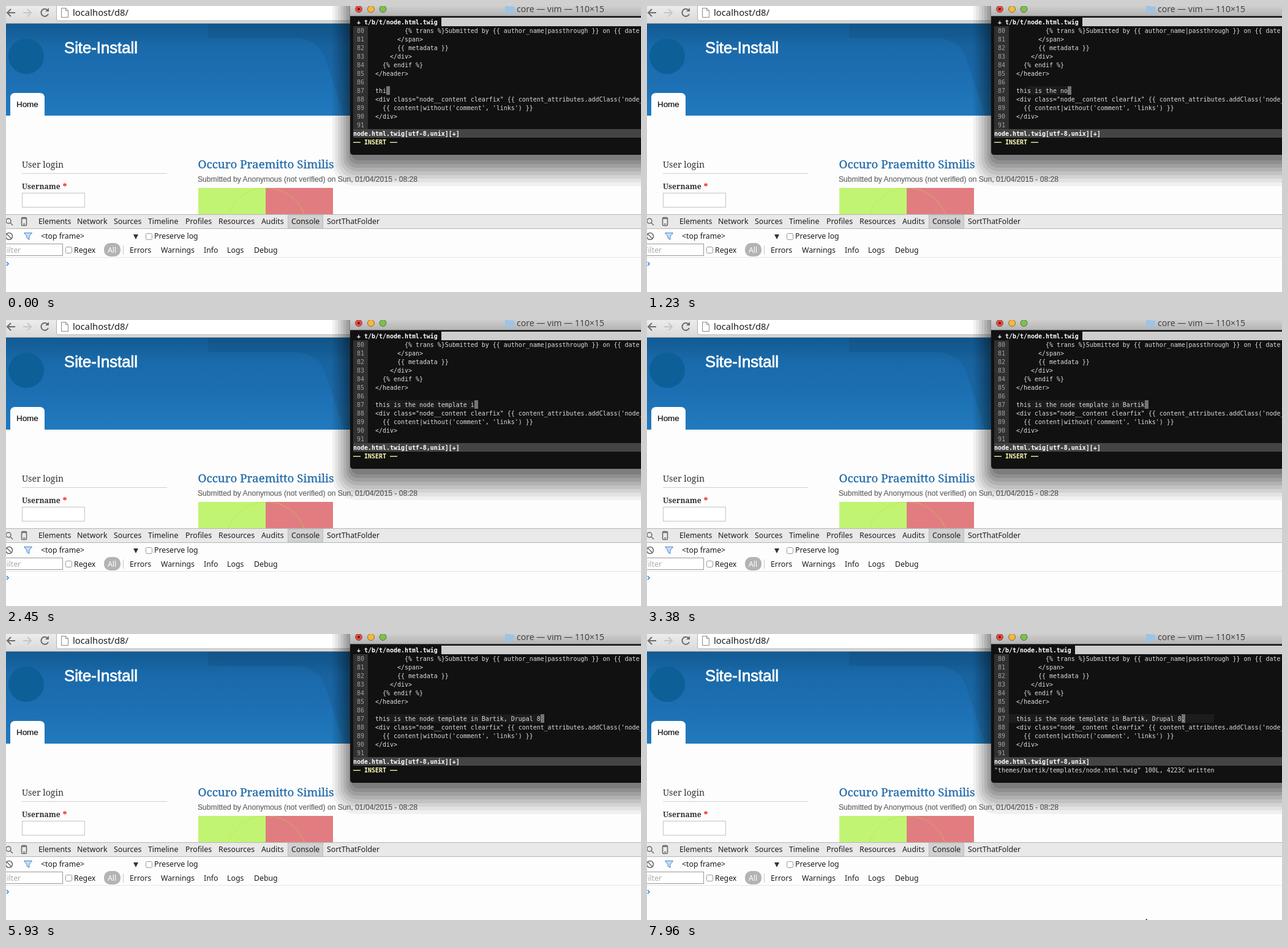
An HTML page that plays this animation: 1037x467 px, repeating every 8000 ms.

```html
<!DOCTYPE html>
<html lang="en">
<head>
<meta charset="utf-8">
<title>Editing a template</title>
<style>
html, body { margin: 0; width: 100%; height: 100%; overflow: hidden; background: #fdfdfd; }
svg { display: block; }
text { white-space: pre; }
.ui { font-family: "Noto Sans", "Open Sans", sans-serif; font-size: 12.3px; fill: #1c1c1c; }
.sans { font-family: "Liberation Sans", sans-serif; }
.serif { font-family: "Noto Serif", serif; fill: #333; }
.term { font-family: "DejaVu Sans Mono", monospace; font-size: 9.967px; fill: #dedede; }
.bold { font-weight: bold; fill: #fff; }
.num { fill: #a2a2a2; }
.line { fill: none; stroke: #666; stroke-width: 1.5; }
</style>
</head>
<body>
<svg width="1037" height="467" viewBox="0 0 1037 467">
  <defs>
    <linearGradient id="toolbar" x2="0" y2="1"><stop stop-color="#ececec"/><stop offset="1" stop-color="#d9d9d9"/></linearGradient>
    <linearGradient id="header" x2="0" y2="1">
      <stop stop-color="#125b93"/><stop offset=".14" stop-color="#16629e"/>
      <stop offset=".26" stop-color="#1a6aab"/><stop offset=".6" stop-color="#1c6fb2"/>
      <stop offset="1" stop-color="#217abe"/>
    </linearGradient>
    <linearGradient id="titlebar" x2="0" y2="1"><stop stop-color="#d6d6d6"/><stop offset="1" stop-color="#b4b4b4"/></linearGradient>
    <clipPath id="picture"><path d="M314 297H534V340H314z"/></clipPath>
  </defs>

  <!-- Browser toolbar -->
  <rect width="1037" height="28" fill="url(#toolbar)"/>
  <rect x="82.500" y="-6" width="980" height="30" rx="3" fill="#fff" stroke="#b0b0b0"/>
  <g fill="none" stroke="#6c6c6c" stroke-width="2">
    <path d="M15 11H2M8 5L2 11L8 17"/>
    <path d="M28 11H41M35 5L41 11L35 17" stroke="#c6c6c6"/>
    <path d="M68 7A6 6 0 1 0 69 13"/><path d="M70 3V9H64z" fill="#6c6c6c" stroke="none"/>
  </g>
  <path d="M90.500 3.500H97.500L101.500 7.500V18.500H90.500zM97.500 3.500V7.500H101.500" fill="#fff" stroke="#8a8a8a"/>
  <text class="ui" x="109" y="16" style="font-size:14.800px">localhost/d8/</text>

  <!-- Web page -->
  <rect y="28" width="1037" height="151" fill="url(#header)"/>
  <path d="M0 28.500H1037" stroke="#8e979e"/>
  <path d="M330 29V52H470Q512 54 522 88L552 179H1037V29z" opacity=".07"/>
  <circle cx="33" cy="82" r="29" fill="#0d5f98"/>
  <text class="sans" x="95" y="77" font-size="25.700" fill="#fff" stroke="#fff" stroke-width=".8">Site-Install</text>
  <path d="M7 179V150Q7 142 15 142H55Q63 142 63 150V179z" fill="#fdfdfd"/>
  <text class="sans" x="17" y="165" font-size="13.400" fill="#111" stroke="#111" stroke-width=".2">Home</text>
  <text class="serif" x="26" y="264" font-size="14.100">User login</text>
  <path d="M26 273.500H263" stroke="#d0d0d0"/>
  <text class="serif" x="26" y="299" font-size="12.200" font-weight="bold">Username</text>
  <text class="serif" x="92.500" y="300" font-size="14" font-weight="bold" style="fill:#f01818">*</text>
  <rect x="26.500" y="305.500" width="102" height="23" fill="#fff" stroke="#c4c4c4"/>
  <text class="serif" x="313.500" y="265" font-size="18.750" style="fill:#2069a8" stroke="#2069a8" stroke-width=".3">Occuro Praemitto Similis</text>
  <text class="sans" x="313" y="287" font-size="12.150" fill="#666" stroke="#666" stroke-width=".2">Submitted by Anonymous (not verified) on Sun, 01/04/2015 - 08:28</text>
  <g clip-path="url(#picture)">
    <rect x="314" y="297" width="110" height="44" fill="#c2f473"/>
    <rect x="424" y="297" width="110" height="44" fill="#e17d81"/>
    <circle cx="425" cy="363" r="66" fill="none" stroke="#b3e238" opacity=".5"/>
  </g>

  <!-- Developer tools -->
  <rect y="340" width="1037" height="127" fill="#fdfdfd"/>
  <rect y="340" width="1037" height="23" fill="#e9e9e9"/>
  <path d="M0 340.500H1037M0 363.500H1037" stroke="#b6b6b6"/>
  <path d="M0 410.500H1037" stroke="#e4e4e4"/>
  <rect x="460.500" y="341" width="57" height="22" fill="#d0d0d0" stroke="#bcbcbc"/>
  <circle class="line" cx="4" cy="351" r="4"/><path class="line" d="M7 354L11 358" stroke-width="2"/>
  <rect class="line" x="25.500" y="345.500" width="8" height="13" rx="1.500"/><path class="line" d="M26 347H33M28 356H31"/>
  <circle class="line" cx="5" cy="376" r="5.500"/><path class="line" d="M1 372L9 380"/>
  <path d="M29.500 370.500H42.500L38 376V381.500L34 379V376z" fill="#c5dcf8" stroke="#4b86d2"/>
  <path d="M208 373H216L212 381z" fill="#333"/>
  <g fill="#fff" stroke="#999">
    <rect x="228.500" y="371.500" width="10" height="10" rx="2"/>
    <rect x="97.500" y="393.500" width="10" height="10" rx="2"/>
    <rect x="-4" y="388.500" width="96.500" height="19"/>
  </g>
  <rect x="160" y="387" width="27" height="22" rx="10" fill="#b3b3b3"/>
  <path d="M191.500 391V406" stroke="#c8c8c8"/>
  <path d="M1 418L4 421L1 424" fill="none" stroke="#3c80dc" stroke-width="1.600"/>
  <g id="labels" class="ui"></g>

  <!-- Terminal window -->
  <g id="shadow"></g>
  <path d="M562 -10H1037V243H567Q562 243 562 238z" fill="#111"/>
  <rect x="562" y="-5" width="475" height="21" fill="url(#titlebar)"/>
  <path d="M562 16.500H1037" stroke="#555"/>
  <g stroke-opacity=".5" stroke="#222">
    <circle cx="576" cy="5" r="5.500" fill="#ec4b42"/>
    <circle cx="596" cy="5" r="5.500" fill="#f5b83c"/>
    <circle cx="615.500" cy="5" r="5.500" fill="#7cc04a"/>
  </g>
  <circle cx="576" cy="5" r="2" fill="#6b1410"/>
  <path d="M815 0H821L823 1H830V12H815z" fill="#9fc3e2"/>
  <text class="ui" x="834" y="10" style="font-size:14px;fill:#444">core — vim — 110×15</text>
  <rect id="tabFill" y="19" height="14" width="400" fill="#cecece"/>
  <rect x="567" y="33" width="24" height="168" fill="#303030"/>
  <rect x="567" y="201" width="470" height="14" fill="#444"/>
  <rect id="cursorLine" y="131" height="14" fill="#1c1c1c"/>
  <rect id="cursor" width="6" height="14" fill="#747474"/>
  <g id="code" class="term"></g>
  <g class="term">
    <text id="tab" class="bold" x="567" y="30"></text>
    <text id="typed" x="603" y="142"></text>
    <text id="status" class="bold" x="567" y="212"></text>
    <text id="message" x="567" y="226"></text>
  </g>
  <path id="pointer" d="M814 467L816 465L817 467z" fill="#111"/>
</svg>
<script>
const $ = id => document.getElementById(id);

function add(parent, tag, attrs, content = '') {
  const el = document.createElementNS('http://www.w3.org/2000/svg', tag);
  for (const key in attrs) el.setAttribute(key, attrs[key]);
  el.textContent = content;
  $(parent).append(el);
}

const labelRows = [
  [356, { Elements: 53, Network: 116, Sources: 176, Timeline: 232, Profiles: 293,
          Resources: 347, Audits: 417, Console: 466, SortThatFolder: 524 }],
  [380, { '<top frame>': 57, 'Preserve log': 242 }],
  [403, { Filter: -5, Regex: 111, All: 166, Errors: 202, Warnings: 253, Info: 323, Logs: 361, Debug: 405 }]
];
const tints = { Filter: 'fill:#aaa', All: 'fill:#fff' };
for (const [y, row] of labelRows)
  for (const name in row) add('labels', 'text', { x: row[name], y, style: tints[name] || '' }, name);

// Banded drop shadow, denser towards the window
for (let i = 0; i < 8; i++)
  add('shadow', 'rect', { x: 533 + 4.5 * i, y: -60, width: 600, height: 354 - 6 * i,
    rx: 38 - 4 * i, 'fill-opacity': 0.05 + 0.01 * i });

const lines = [
  "          {% trans %}Submitted by {{ author_name|passthrough }} on {{ date",
  "        </span>",
  "        {{ metadata }}",
  "      </div>",
  "    {% endif %}",
  "  </header>",
  "",
  "",
  "  <div class=\"node__content clearfix\" {{ content_attributes.addClass('node_",
  "    {{ content|without('comment', 'links') }}",
  "  </div>",
  ""
];
lines.forEach((line, i) => {
  const y = 44 + 14 * i;
  add('code', 'text', { x: 573, y, class: 'num' }, 80 + i);
  add('code', 'text', { x: 591, y }, line);
});

const sentence = 'this is the node template in Bartik, Drupal 8.';
// Typing bursts: first change, last change, steps, characters afterwards
const bursts = [
  [120, 810, 8, 11], [930, 930, 1, 12], [1170, 1400, 5, 17], [1580, 1690, 3, 20],
  [1870, 1980, 2, 23], [2160, 2270, 3, 26], [2450, 2560, 3, 29], [2740, 2740, 1, 30],
  [2920, 2970, 2, 32], [3150, 3210, 2, 34], [3380, 3380, 1, 35], [3620, 3680, 2, 37],
  [4270, 4270, 1, 38], [4450, 4500, 2, 40], [4680, 4970, 4, 44], [5930, 5930, 1, 45],
  [6470, 6470, 1, 46]
];

function typedCount(t) {
  let count = 3;
  for (const [from, to, steps, end] of bursts) {
    if (t < from) break;
    const done = steps === 1 ? 1 : Math.min(steps, 1 + Math.floor((t - from) / (to - from) * (steps - 1) + 1e-6));
    count += Math.round((end - count) * done / steps);
  }
  return count;
}

function put(id, text) {
  if ($(id).textContent !== text) $(id).textContent = text;
}

function draw(t) {
  const count = typedCount(t);
  const insert = t < 6590, command = t >= 6830 && t < 7600, saved = t >= 7600;
  const typedWord = t >= 7000 ? ':w' : ':';
  const cell = insert ? count : count - 1;

  put('typed', sentence.slice(0, count));
  put('tab', saved ? ' t/b/t/node.html.twig' : ' + t/b/t/node.html.twig');
  put('status', 'node.html.twig[utf-8,unix]' + (saved ? '' : '[+]'));
  put('message', insert ? '—— INSERT ——' : command ? typedWord
    : saved ? '"themes/bartik/templates/node.html.twig" 100L, 4223C written' : '');
  $('message').setAttribute('style', insert ? 'font-weight:bold;fill:#ffffb4' : '');
  $('tabFill').setAttribute('x', saved ? 699 : 711);
  $('cursor').setAttribute('x', command ? 567 + 6 * typedWord.length : 603 + 6 * cell);
  $('cursor').setAttribute('y', command ? 215 : 131);
  $('cursorLine').setAttribute('x', saved ? 591 : 621);
  $('cursorLine').setAttribute('width', saved ? 335 : 6 * (count - 3));
  $('pointer').setAttribute('visibility', t >= 7960 ? 'visible' : 'hidden');
}

const start = performance.now();
function tick(now) {
  draw(Math.max(0, now - start) % 8000);
  requestAnimationFrame(tick);
}
draw(0);
requestAnimationFrame(tick);
</script>
</body>
</html>
```
